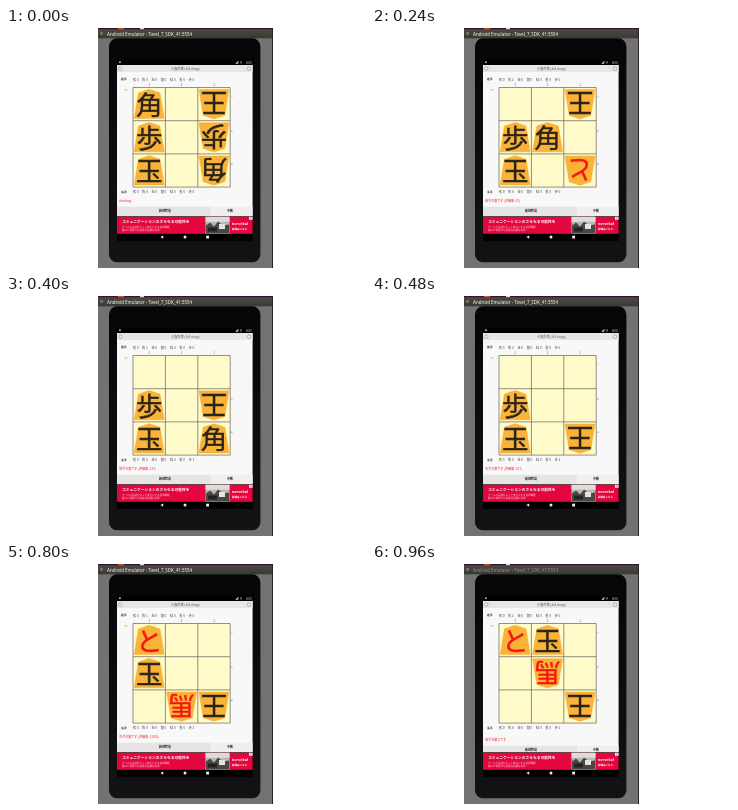
Animation, 360 px wide and 240 px high, one loop 1.04 s. Source, as an HTML page:

```html
<!DOCTYPE html>
<html lang="ja">
<head>
<meta charset="utf-8">
<title>3x3 shogi</title>
<style>
html, body { margin: 0; width: 100%; height: 100%; overflow: hidden; background: #fff; }
svg { display: block; width: 100vw; height: 100vh; }
text { font-family: "Noto Sans CJK JP", "Noto Sans CJK", sans-serif; dominant-baseline: central; }
.mid { text-anchor: middle; }
.latin { font-family: "Open Sans", "DejaVu Sans", sans-serif; }
</style>
</head>
<body>
<svg id="stage" viewBox="0 0 360 240">
  <defs>
    <linearGradient id="shell" x1="0" y1="0" x2="0" y2="1">
      <stop offset="0" stop-color="#060606"/>
      <stop offset="1" stop-color="#131315"/>
    </linearGradient>
    <linearGradient id="bar" x1="0" y1="0" x2="0" y2="1">
      <stop offset="0" stop-color="#4c4a43"/>
      <stop offset="1" stop-color="#3a3833"/>
    </linearGradient>
  </defs>
</svg>
<script>
const NS = "http://www.w3.org/2000/svg";
const stage = document.getElementById("stage");
const STEP = 80, COUNT = 13;
const LEFT = 127, TOP = 59.5, CW = 32.4, CH = 33.2;
const KINDS = "飛角金銀桂香歩";
const PROMOTED = { "歩": "と", "角": "馬" };

function add(parent, tag, attrs, content) {
  const el = document.createElementNS(NS, tag);
  for (const key in attrs) el.setAttribute(key, attrs[key]);
  if (content !== undefined) el.textContent = content;
  parent.appendChild(el);
  return el;
}
const box = (parent, x, y, width, height, fill, more) =>
  add(parent, "rect", { x, y, width, height, fill, ...more });
const label = (parent, x, y, size, fill, content, more) =>
  add(parent, "text", { x, y, "font-size": size, fill, ...more }, content);
const line = (parent, d, stroke, width, fill = "none") =>
  add(parent, "path", { d, stroke, "stroke-width": width, fill });
const dot = (parent, cx, cy, r, fill, more) =>
  add(parent, "circle", { cx, cy, r, fill, ...more });

// Moves as [from, to, promotes]; a piece name instead of a cell is a drop.
const MOVES = [
  [0, 8], [5, 8, true], ["角", 4], [2, 5], [4, 8], [5, 8],
  [3, 0, true], ["角", 5], [6, 3], [5, 7, true], [3, 1], [7, 4]
];

function play() {
  const piece = (kind, side) => ({ kind, side, up: false });
  let cells = Array(9).fill(null);
  ["角", "歩", "玉"].forEach((k, row) => cells[row * 3] = piece(k, 0));
  ["王", "歩", "角"].forEach((k, row) => cells[row * 3 + 2] = piece(k, 1));
  let hands = [{}, {}];
  const states = [{ cells, hands }];
  MOVES.forEach(([from, to, promotes], n) => {
    const side = n % 2;
    cells = cells.slice();
    hands = hands.map(h => ({ ...h }));
    const count = (kind, d) => hands[side][kind] = (hands[side][kind] || 0) + d;
    if (typeof from === "string") {
      count(from, -1);
      cells[to] = piece(from, side);
    } else {
      if (cells[to]) count(cells[to].kind, 1);
      cells[to] = { ...cells[from], up: cells[from].up || !!promotes };
      cells[from] = null;
    }
    states.push({ cells, hands });
  });
  return states;
}

function message(n) {
  if (n === 0) return "thinking...";
  if (n === COUNT - 1) return "後手の勝ちです";
  const score = n < 5 ? -27 : n < 8 ? -127 : -12001;
  return (n % 2 ? "後手" : "先手") + "の番です (評価値:" + score + ")";
}

function drawDevice() {
  box(stage, 92, 0, 174.5, 240, "#727272");
  box(stage, 92, 1, 174.5, 9.3, "url(#bar)");
  box(stage, 92, 0, 174.5, 1.2, "#3a1230");
  box(stage, 112, 0, 6, 1.2, "#d9541e");
  box(stage, 134, 0, 4, 1.2, "#ddd");
  box(stage, 266, 0, 1, 240, "#2d1c29");
  dot(stage, 95.5, 5.4, 1.6, "#77736a");
  box(stage, 103, 10.3, 151.4, 224, "url(#shell)", { rx: 8 });
  dot(stage, 180, 20, .8, "#1b1b1e");
  box(stage, 111, 31.8, 135.6, 181, "#000");
  box(stage, 111, 37, 135.6, 151.3, "#f8f8f8");
  box(stage, 111, 37, 135.6, 7, "#e6e6e6");
  box(stage, 113, 33.3, 1.8, 1.8, "#aaa");
  line(stage, "M230 35.4l2-2v2zM235 33.2v2.3", "#ddd", .8);
  label(stage, 240, 34.5, 2.8, "#eee", "8:00", { class: "latin" });
  for (const x of [114.3, 243]) {
    dot(stage, x, 40.6, 1.7, "#f5f5f5", { stroke: "#888", "stroke-width": .6 });
  }
  label(stage, 179.5, 40.7, 3.1, "#555", "小盤将棋 (3x3 shogi)", { class: "mid" });
}

function drawBoard() {
  box(stage, LEFT, TOP, CW * 3, CH * 3, "#fffac9");
  let d = "";
  for (let i = 0; i < 4; i++) {
    d += `M${LEFT + i * CW} ${TOP}v${CH * 3}M${LEFT} ${TOP + i * CH}h${CW * 3}`;
  }
  line(stage, d, "#66645a", .7);
  [..."321"].forEach((c, i) =>
    label(stage, LEFT + (i + .5) * CW, 57, 3, "#666", c, { class: "mid" }));
  [..."一二三"].forEach((c, i) =>
    label(stage, 225.7, TOP + (i + .3) * CH, 2.8, "#666", c, { class: "mid" }));
  box(stage, 118.8, 61, 2.6, 1.7, "#f8d24c");
}

function drawAd() {
  const y = 188.8, h = 17;
  box(stage, 111, y, 135.6, h, "#e3073d");
  label(stage, 116, 193.3, 3.75, "#fff", "コミュニケーションのさらなる可能性を", { "font-weight": 700 });
  label(stage, 116, 198.8, 2.5, "#ffd9df", "チームの会話をもっと身近にする音声機器");
  label(stage, 116, 202.3, 2.5, "#ffd9df", "離れた場所でも快適な会議を実現");
  box(stage, 199.5, y, 24, h, "#b9b7b5");
  box(stage, 199.5, y, 24, 5, "#dedcd8");
  line(stage, "M200 205.5v-8l4-3 4 4 4-5 5 4 6-1v9z", "none", 0, "#4a4746");
  box(stage, 202, 199.5, 9, 4, "#232223");
  box(stage, 213, 196, 6, 5, "#e5e3e0");
  label(stage, 225.8, 195, 3.7, "#fff", "norvekal", { class: "latin", "font-weight": 700 });
  label(stage, 226, 200.6, 2.5, "#fff", "詳細はこちら", { "font-weight": 700 });
  box(stage, 243, y, 3.6, 3, "#eee");
  line(stage, "M243.9 189.4l1.8 1.6M245.7 189.4l-1.8 1.6", "#4a87a8", .5);
}

function drawNav() {
  line(stage, "M157.2 207.4v3.4l-2.8-1.7z", "none", 0, "#eee");
  dot(stage, 179, 209.1, 1.5, "#eee");
  box(stage, 200.2, 207.7, 2.8, 2.8, "#eee");
}

function drawPiece(parent, p, cell) {
  const x = LEFT + (cell % 3 + .5) * CW;
  const y = TOP + (Math.floor(cell / 3) + .5) * CH;
  const g = add(parent, "g", { transform: `translate(${x} ${y})` + (p.side ? " rotate(180)" : "") });
  line(g, "M0-14.8L10.8-11.2L15 14.5H-15L-10.8-11.2Z", "#eca532", .4, "#fab336");
  const ink = p.up ? "#f51414" : "#29231a";
  label(g, 0, -.8, 26.5, ink, p.up ? PROMOTED[p.kind] : p.kind,
    { class: "mid", stroke: ink, "stroke-width": .4 });
}

function drawHand(parent, name, hand, y) {
  label(parent, 118, y, 2.7, "#222", name, { class: "mid", "font-weight": 700 });
  [...KINDS].forEach((kind, i) =>
    label(parent, 126.8 + i * 9.3, y, 3.2, "#444", kind + " " + (hand[kind] || 0)));
}

function drawState({ cells, hands }, n) {
  const g = add(stage, "g", { visibility: "hidden" });
  const last = n === COUNT - 1, shift = last ? 3 : 0;
  label(g, 101, 5.5, 4.4, last ? "#85817a" : "#dedbd2",
    "Android Emulator - Tovel_7_SDK_41:5554", { class: "latin", "font-weight": 600 });
  drawHand(g, "後手", hands[1], 51.3);
  drawHand(g, "先手", hands[0], 163.5);
  cells.forEach((p, i) => p && drawPiece(g, p, i));
  label(g, 113.3, 173 + shift, 3, "#e8202c", message(n));
  const top = 178.7 + shift, height = 188 - top;
  box(g, 111, top, 94, height, "#e5e5e5");
  box(g, 205.3, top, 41.3, height, "#efefef");
  const button = (x, name) =>
    label(g, x, 183 + shift, 3, "#222", name, { class: "mid", "font-weight": 700 });
  button(159, "新規対局");
  button(224, "中断");
  return g;
}

drawDevice();
drawBoard();
const scenes = play().map(drawState);
drawAd();
drawNav();

let shown = -1;
const start = performance.now();
function tick(now) {
  const n = Math.floor(Math.max(0, now - start) / STEP) % COUNT;
  if (n !== shown) {
    scenes.forEach((g, i) => g.setAttribute("visibility", i === n ? "visible" : "hidden"));
    shown = n;
  }
  requestAnimationFrame(tick);
}
tick(start);
</script>
</body>
</html>
```
